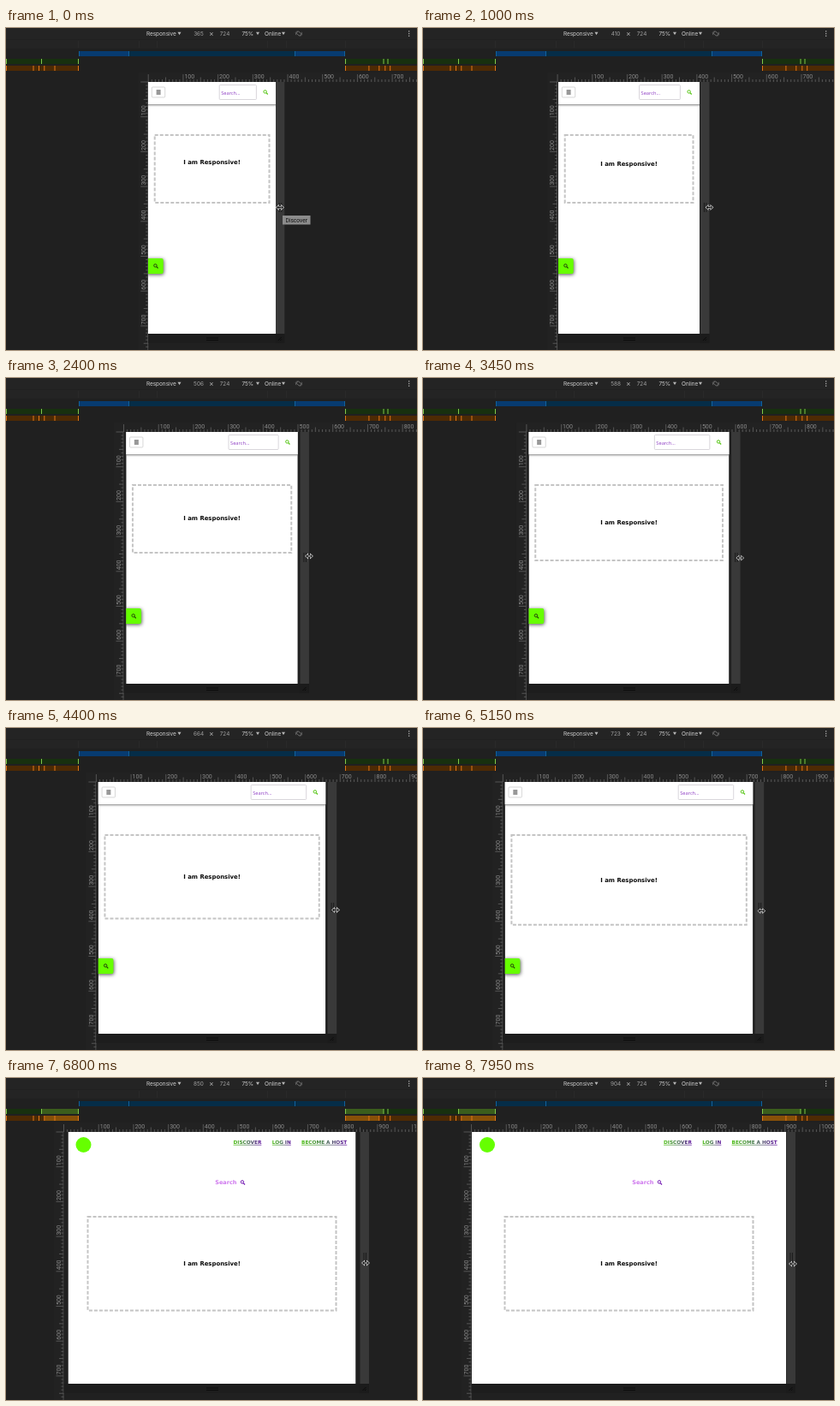
Write an HTML page with a canvas that moves like this. It is 480x376 px and loops after 8 s.

```html
<!DOCTYPE html>
<html lang="en">
<head>
<meta charset="utf-8">
<title>Responsive resize</title>
<style>
html, body { margin: 0; width: 100%; height: 100%; overflow: hidden; background: #202020; }
canvas { display: block; width: 480px; height: 376px; }
</style>
</head>
<body>
<canvas id="stage"></canvas>
<script>
const W = 480, H = 376, LOOP = 8000, STEP = 50;
const ZOOM = 0.407, CENTER = 240.5, TOP = 63, BOTTOM = 357;
const WIDE_AT = 5800, FADE_FROM = 5850, FADE_MS = 400, TOOLTIP_MS = 300;
const SANS = 'Roboto, "Liberation Sans", sans-serif';
const BOLD = '"DejaVu Sans", Verdana, sans-serif';
const LIME = '#66ff00';

// time, viewport width, painted page width (stage px), cursor x, cursor y
const KEYS = [
  [0, 365, 149, 320, 209.5],
  [1000, 410, 165, 334.5, 209.5],
  [2400, 506, 200.5, 354, 208],
  [4400, 664, 265.5, 385, 212.5],
  [5850, 778, 311, 405, 214.5],
  [6800, 850, 336, 420, 216],
  [7950, 904, 367, 432, 217]
];

const canvas = document.getElementById('stage');
const g = canvas.getContext('2d');
const dpr = window.devicePixelRatio || 1;
canvas.width = W * dpr;
canvas.height = H * dpr;

const secant = (i, c) => (KEYS[i + 1][c] - KEYS[i][c]) / (KEYS[i + 1][0] - KEYS[i][0]);

function slope(i, c) {
  if (i === 0) return secant(0, c) / 2;
  if (i === KEYS.length - 1) return secant(i - 1, c) / 2;
  return (secant(i - 1, c) + secant(i, c)) / 2;
}

// Cubic Hermite through the key points
function sample(t, c) {
  t = Math.min(t, KEYS[KEYS.length - 1][0]);
  let i = 0;
  while (i < KEYS.length - 2 && t > KEYS[i + 1][0]) i++;
  const a = KEYS[i], b = KEYS[i + 1], d = b[0] - a[0], u = (t - a[0]) / d;
  const s = u * u * (3 - 2 * u);
  return a[c] + (b[c] - a[c]) * s
    + d * u * (1 - u) * ((1 - u) * slope(i, c) - u * slope(i + 1, c));
}

function rect(x, y, w, h, color) {
  g.fillStyle = color;
  g.fillRect(x, y, w, h);
}

function line(x1, y1, x2, y2, color, width = 1) {
  g.strokeStyle = color;
  g.lineWidth = width;
  g.beginPath();
  g.moveTo(x1, y1);
  g.lineTo(x2, y2);
  g.stroke();
}

function text(str, x, y, font, color, align = 'left') {
  g.font = font;
  g.fillStyle = color;
  g.textAlign = align;
  g.fillText(str, x, y);
}

function shadowed(blur, dx, dy, color, draw) {
  g.save();
  g.shadowBlur = blur * dpr;
  g.shadowOffsetX = dx * dpr;
  g.shadowOffsetY = dy * dpr;
  g.shadowColor = color;
  draw();
  g.restore();
}

function roundBox(x, y, w, h, r, fill, stroke) {
  g.beginPath();
  g.roundRect(x, y, w, h, r);
  if (fill) { g.fillStyle = fill; g.fill(); }
  if (stroke) { g.strokeStyle = stroke; g.lineWidth = 0.7; g.stroke(); }
}

function magnifier(x, y, color) {
  g.strokeStyle = color;
  g.lineWidth = 1;
  g.beginPath();
  g.arc(x - 0.6, y - 0.6, 1.7, 0, 7);
  g.stroke();
  line(x + 0.7, y + 0.7, x + 2.5, y + 2.5, color, 1.2);
}

function caret(x, y) {
  g.fillStyle = '#b5b5b5';
  g.beginPath();
  g.moveTo(x - 2, y - 1.7);
  g.lineTo(x + 2, y - 1.7);
  g.lineTo(x, y + 1.8);
  g.fill();
}

function toolbar(width) {
  const font = '6.4px Inter, ' + SANS, ink = '#d0d0d0', dim = '#a0a0a0';
  rect(0, 0, W, 13, '#242424');
  text('Responsive', 164, 8.8, font, ink);
  caret(202.5, 6.5);
  text(Math.round(width), 225, 8.8, font, dim, 'center');
  text('×', 240, 9.5, '9px ' + SANS, dim, 'center');
  text('724', 255.5, 8.8, font, dim, 'center');
  text('75%', 275.5, 8.8, font, ink);
  caret(294, 6.5);
  text('Online', 302, 8.8, font, ink);
  caret(324, 6.5);
  g.save();
  g.translate(342, 6.5);
  g.rotate(-Math.PI / 4);
  roundBox(-1.6, -2.4, 3.2, 4.8, 0.5, null, '#8a8a8a');
  g.strokeStyle = '#777';
  for (const a of [0.3, 3.44]) {
    g.beginPath();
    g.arc(0, 0, 3.6, a, a + 1.6);
    g.stroke();
  }
  g.restore();
  for (const y of [3.8, 6.5, 9.2]) rect(470, y - 0.6, 1.3, 1.3, '#aaa');
}

function mediaBars(wide) {
  rect(0, 13, W, 39, '#202020');
  rect(0, 14, W, 10, '#242424');
  for (const x of [84, 155, 176, 305, 327, 396]) rect(x, 15, 0.8, 8, '#2c2c2c');

  rect(85, 27, 311, 6, '#052d48');
  if (!wide) {
    rect(85, 27, 59, 6, '#073b70');
    rect(337, 27, 59, 6, '#073b70');
  }
  for (const x of [85, 143, 337, 395]) rect(x, 27, 1, 6, '#12619c');

  for (const [x, w] of [[0, 85], [396, 84]]) {
    rect(x, 36, w, 6, '#17300f');
    rect(x, 44, w, 6, '#4d2a04');
  }
  if (wide) {
    rect(41, 36, 44, 6, '#3a5d1c');
    rect(396, 36, 45, 6, '#3a5d1c');
    rect(45, 44, 40, 6, '#875008');
    rect(396, 44, 40, 6, '#875008');
  }
  for (const x of [0, 41, 84, 396, 440.5, 445.5]) rect(x, 36, 1, 6, '#7fc84a');
  for (const x of [0, 31.5, 38, 44.3, 56.5, 84, 396, 423.4, 435.3, 442.3, 448.2])
    rect(x, 44, 1, 6, '#e0761a');
}

// side +1 labels after the tick to the right, drawn along the current x axis
function ruler(length, direction) {
  for (let n = 0; n * 10 * ZOOM < length; n++) {
    const x = direction * n * 10 * ZOOM;
    const major = n % 10 === 0;
    line(x, major ? -9 : n % 5 === 0 ? -5.5 : -3, x, 0, '#6c6c6c', 0.7);
    if (n && major) text(n * 10, x + 1.5, -3.6, '7px ' + SANS, '#8b8b8b');
  }
}

function rulers(left) {
  rect(left - 12, 52, W, 11, '#222');
  rect(left - 12, 52, 12, H, '#222');
  g.save();
  g.translate(left, TOP);
  ruler(W - left, 1);
  g.rotate(-Math.PI / 2);
  ruler(H - TOP, -1);
  g.restore();
  line(left - 0.5, TOP, left - 0.5, H, '#5a5a5a', 0.8);
}

function handles(left, right) {
  rect(left, BOTTOM, right - left, 11, '#1d1d1d');
  rect(right, TOP, 10.5, BOTTOM - TOP, '#393939');
  rect(right, BOTTOM, 10.5, 11, '#1b1b1b');
  for (const d of [0, 2.5]) {
    rect(234, 361.5 + d, 14, 1, '#0c0c0c');
    rect(right + 4 + d, 204, 1, 11, '#1c1c1c');
    line(right + 3 + d, 365, right + 7, 361 + d, '#080808', 0.8);
  }
}

function dashedBox(x, y, w, h) {
  g.strokeStyle = '#c4c4c4';
  g.lineWidth = 2;
  g.setLineDash([4, 2]);
  g.strokeRect(x + 1, y + 1, w - 2, h - 2);
  g.setLineDash([]);
}

function headline(x, y) {
  text('I am Responsive!', x, y + 2.5, 'bold 6.9px ' + BOLD, '#0a0a0a', 'center');
}

const halfHeight = boxWidth => 32 + 0.151 * (boxWidth - 135);

function narrowPage(left, width) {
  const right = left + width, mid = left + width / 2;
  shadowed(2.5, 0, 1, '#777', () => rect(left - 5, TOP - 5, width + 10, 31, '#fff'));

  roundBox(left + 4.3, 69, 15.4, 12, 1, '#fff', '#c8c8c8');
  for (const y of [73, 75, 77]) rect(left + 9.6, y - 0.5, 5, 1, '#333');

  const field = Math.min(64.5, width * 0.29), x = right - 22.6 - field;
  roundBox(x, 66.5, field, 17, 1, '#fff', '#c9c5cc');
  text('Search...', x + 2, 77.6, '5.7px "Open Sans", sans-serif', '#8f3fc4');
  magnifier(right - 11.8, 75, '#4fc40a');

  const boxWidth = width - 13.2, half = halfHeight(boxWidth);
  dashedBox(left + 6.7, 124, boxWidth, Math.max(81, half * 2));
  headline(mid, 124 + half);

  shadowed(4, 0.5, 1, 'rgba(0,0,0,.7)', () => roundBox(left - 3, 269, 20.7, 18, 2, LIME));
  magnifier(left + 9, 278, '#24400c');
}

function navLink(label, x) {
  const font = 'bold 5.75px ' + BOLD;
  g.font = font;
  const w = g.measureText(label).width;
  const paint = g.createLinearGradient(x, 0, x + w, 0);
  paint.addColorStop(0, '#4cc012');
  paint.addColorStop(0.45, '#447f45');
  paint.addColorStop(1, '#5b0a9c');
  text(label, x, 77.2, font, paint);
  rect(x, 77.8, w, 0.7, paint);
}

function widePage(left, width, t) {
  const layout = Math.max(width, 316), right = left + layout, mid = left + layout / 2;
  const u = Math.min(1, Math.max(0, (t - FADE_FROM) / FADE_MS));
  const fade = u * u * (3 - 2 * u);

  g.fillStyle = LIME;
  g.beginPath();
  g.arc(left + 18, 78, 9, 0, 7);
  g.fill();

  navLink('DISCOVER', right - 143);
  navLink('LOG IN', right - 97.7);
  navLink('BECOME A HOST', right - 63.5);

  const searchY = 126 - 4 * fade;
  if (fade < 1) {
    g.globalAlpha = 1 - fade;
    shadowed(5, 0.5, 1, 'rgba(0,0,0,.7)', () =>
      roundBox(mid - 61.5, searchY - 14.5, 106.5, 29, 2, LIME));
  }
  g.globalAlpha = fade;
  text('Search', mid + 3.7, searchY + 2.4, 'bold 6.5px ' + BOLD, '#cf78ee');
  g.globalAlpha = 1 - fade;
  magnifier(mid + 36, searchY, '#222');
  g.globalAlpha = fade;
  magnifier(mid + 36, searchY, '#6f12b0');
  g.globalAlpha = 1;

  const boxWidth = 292, half = halfHeight(boxWidth), y = 169 - 8 * fade;
  dashedBox(mid - boxWidth / 2, y, boxWidth, half * 2);
  headline(mid, y + half);
}

function cursor(x, y) {
  g.beginPath();
  for (const s of [-1, 1]) {
    g.moveTo(x + s * 4, y);
    g.lineTo(x + s * 1.6, y - 2.2);
    g.lineTo(x + s * 1.6, y + 2.2);
    g.closePath();
  }
  g.rect(x - 2, y - 0.5, 4, 1);
  g.strokeStyle = '#eee';
  g.lineWidth = 1.1;
  g.stroke();
  g.fillStyle = '#111';
  g.fill();
}

function draw(t) {
  const width = sample(t, 1), pageWidth = sample(t, 2);
  const left = CENTER - width * ZOOM / 2, right = left + width * ZOOM;
  const pageLeft = CENTER - pageWidth / 2;

  g.setTransform(dpr, 0, 0, dpr, 0, 0);
  rect(0, 0, W, H, '#202020');
  toolbar(width);
  mediaBars(pageWidth / ZOOM > 768);
  rulers(left);
  rect(left, TOP, right - left, BOTTOM - TOP, '#202020');
  handles(left, right);

  g.save();
  g.beginPath();
  g.rect(pageLeft, TOP, pageWidth, BOTTOM - TOP);
  g.clip();
  rect(pageLeft, TOP, pageWidth, BOTTOM - TOP, '#fff');
  if (t < WIDE_AT) narrowPage(pageLeft, pageWidth);
  else widePage(pageLeft, pageWidth, t);
  g.restore();

  if (t < TOOLTIP_MS) {
    rect(323, 219, 32.5, 10.5, '#8c8c8c');
    text('Discover', 339.2, 226.8, '6.6px ' + SANS, '#111', 'center');
  }
  cursor(sample(t, 3), sample(t, 4));
}

const start = performance.now();
function tick() {
  const t = (performance.now() - start) % LOOP;
  draw(Math.floor(t / STEP) * STEP);
  requestAnimationFrame(tick);
}
tick();
</script>
</body>
</html>
```
